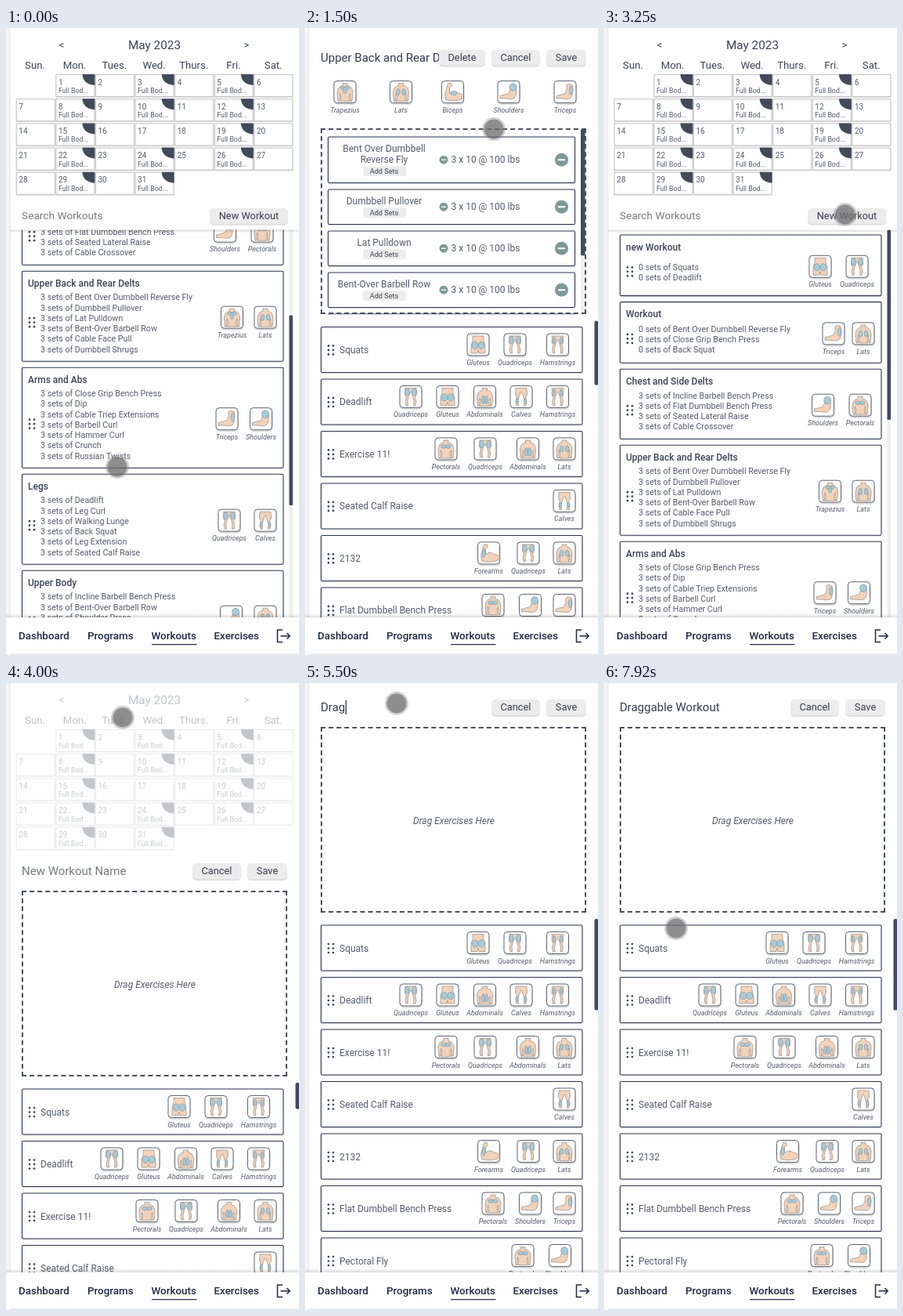
Recreate the animation shown at these times as an HTML page. Size 374x800 px, loop 8 s.

```html
<!DOCTYPE html>
<html lang="en">
<head>
<meta charset="utf-8">
<title>Workout planner</title>
<style>
  html, body { margin: 0; width: 100%; height: 100%; overflow: hidden; background: #fefefe; }
  #stage { display: block; width: 100vw; height: 100vh; font-family: Roboto, sans-serif; }
  text { white-space: pre; }
  .card { fill: #fefefe; stroke: #2b344f; stroke-width: 1.1; }
  .shade { fill: #000; opacity: .13; }
  .thumb { fill: #3e4a61; }
  .track { fill: #efefef; }
  .dash { box-sizing: border-box; height: 100%; border: 2px dashed #4a505c; }
</style>
</head>
<body>
<svg id="stage" viewBox="0 0 374 800"></svg>
<script>
const LOOP = 8000, NAV_TOP = 752, COLLAPSE = 209;
const INK = '#3d4453', SOFT = '#565d69', NAVY = '#1f2a44';

const text = (x, y, str, size, { fill = INK, anchor = 'start', weight = 400, italic = false, id = '' } = {}) =>
  `<text x="${x}" y="${y}" font-size="${size}" fill="${fill}" text-anchor="${anchor}" font-weight="${weight}"` +
  `${italic ? ' font-style="italic"' : ''}${id ? ` id="${id}"` : ''}>${str.replace(/</g, '&lt;')}</text>`;
const rect = (x, y, w, h, attrs = '') => `<rect x="${x}" y="${y}" width="${w}" height="${h}" ${attrs}/>`;
const move = (x, y, body) => `<g transform="translate(${x} ${y})">${body}</g>`;
const mid = { anchor: 'middle' };

// ---- muscle icons: label width, body shape, highlighted ellipses (x, y, rx, ry)
const SHAPES = {
  torso: 'M-9 12 L-10 2 Q-10 -5 -6 -7 L-3 -8 V-11 H3 V-8 L6 -7 Q10 -5 10 2 L9 12 H7 L6.5 2 L5 6 L6 12 H-6 L-5 6 L-6.5 2 L-7 12Z',
  legs: 'M-7 -11 H7 L7.5 -3 L5.5 1 L7 6 L6 11 H3.5 L4 5 L2.5 -1 L.5 -6 H-.5 L-2.5 -1 L-4 5 L-3.5 11 H-6 L-7 6 L-5.5 1 L-7.5 -3Z',
  hips: 'M-7 -11 H7 Q6 -5 9 1 L9 11 H1 L0 7 L-1 11 H-9 L-9 1 Q-6 -5 -7 -11Z',
  bent: 'M2 -9 Q5 -12 9 -9 Q11 -3 9 4 Q8 9 3 9 L-11 8 V5 L0 2 Q3 -3 2 -9Z',
  flexed: 'M-9 10 Q-11 3 -8 -4 L-6 -11 H-2 L-1 -8 L-4 -5 L-4 2 Q1 -3 6 1 L12 3 V9 Q3 13 -9 10Z'
};
const MUSCLES = {
  Quadriceps: [46, 'legs', [[-4.5, -6, 2.7, 4.6], [4.5, -6, 2.7, 4.6]]],
  Hamstrings: [47, 'legs', [[-4.5, -5, 1.6, 4.5], [4.5, -5, 1.6, 4.5]]],
  Calves: [30, 'legs', [[-5.3, 5, 1.4, 3.6], [5.3, 5, 1.4, 3.6]]],
  Gluteus: [32, 'hips', [[-4, 1, 4, 4.6], [4, 1, 4, 4.6]]],
  Abdominals: [47, 'torso', [[-2, 4, 1.8, 5.5], [2, 4, 1.8, 5.5]]],
  Pectorals: [38, 'torso', [[-3, -3, 3.2, 2.3], [3, -3, 3.2, 2.3]]],
  Lats: [30, 'torso', [[-3.5, 0, 2.3, 4], [3.5, 0, 2.3, 4]]],
  Trapezius: [39, 'torso', [[-2.5, -5, 3.2, 2], [2.5, -5, 3.2, 2], [0, -2, 2, 4.5]]],
  Shoulders: [41, 'bent', [[5.5, -6, 4.4, 4.8]]],
  Triceps: [30, 'bent', [[7.5, -2, 2.2, 5.5]]],
  Biceps: [30, 'flexed', [[1.5, 1.5, 4, 2.6]]],
  Forearms: [39, 'flexed', [[-6.5, 0, 2, 5.5]]]
};

function muscle(name, x, y) {
  const [, shape, spots] = MUSCLES[name];
  const marks = spots.map(([cx, cy, rx, ry]) =>
    `<ellipse cx="${cx}" cy="${cy}" rx="${rx}" ry="${ry}" fill="#a6cbdc" stroke="#6d838f" stroke-width=".5"/>`).join('');
  return move(x, y,
    rect(-14, -12.5, 29, 29, 'rx="5" class="shade"') +
    rect(-14, -14, 28, 28, 'rx="4" fill="#fefefe" stroke="#5d636f"') +
    `<path d="${SHAPES[shape]}" fill="#f2d3ba" stroke="#857a72" stroke-width=".6"/>` + marks +
    text(0, 26, name, 9, { fill: SOFT, italic: true, ...mid }));
}

function muscleRow(names, y) {
  let right = 346;
  return [...names].reverse().map(name => {
    const w = MUSCLES[name][0], x = right - w / 2;
    right -= w + 8;
    return muscle(name, x, y);
  }).join('');
}

const handle = y => [30, 36].map(x => [-5.5, 0, 5.5].map(dy =>
  `<circle cx="${x}" cy="${y + dy}" r="1.35" fill="#3d4453"/>`).join('')).join('');

const panel = (x, w, h) => rect(x, 2, w, h, 'rx="2" class="shade"') + rect(x, .5, w, h, 'rx="1.5" class="card"');

const button = (x, y, w, label) => rect(x, y - 9, w, 21, 'rx="5" fill="#dfdfdf"') +
  rect(x, y - 10, w, 20, 'rx="5" fill="#ececec"') +
  text(x + w / 2, y + 4.2, label, 12.8, { fill: '#373d4a', ...mid });

// ---- calendar
function calendar() {
  const days = ['Sun.', 'Mon.', 'Tues.', 'Wed.', 'Thurs.', 'Fri.', 'Sat.'];
  let out = text(71, 26, '<', 13, mid) + text(189.5, 27, 'May 2023', 15.3, mid) + text(307, 26, '>', 13, mid);
  days.forEach((d, i) => out += text(37 + 50.7 * i, 52, d, 13.2, mid));
  for (let d = 1; d <= 31; d++) {
    const col = d % 7, busy = col % 2 && d !== 17;
    let cell = rect(0, 1, 50, 29, 'fill="#dedede"') + rect(.5, .5, 49, 28, 'fill="#fefefe" stroke="#c4c4c6"') +
      text(3.5, 13.5, String(d), 10, { fill: SOFT });
    if (busy) cell += '<path d="M34 0H50V14Q35 13 34 0Z" fill="#414a5b"/>' + text(3.5, 24, 'Full Bod...', 8.8, { fill: SOFT });
    out += move(12.8 + 50.6 * col, 59 + 31.2 * Math.floor(d / 7), cell);
  }
  return out;
}

// ---- saved workouts
const WORKOUTS = [
  ['new Workout', 0, ['Squats', 'Deadlift'], ['Gluteus', 'Quadriceps']],
  ['Workout', 0, ['Bent Over Dumbbell Reverse Fly', 'Close Grip Bench Press', 'Back Squat'], ['Triceps', 'Lats']],
  ['Chest and Side Delts', 3, ['Incline Barbell Bench Press', 'Flat Dumbbell Bench Press', 'Seated Lateral Raise',
    'Cable Crossover'], ['Shoulders', 'Pectorals']],
  ['Upper Back and Rear Delts', 3, ['Bent Over Dumbbell Reverse Fly', 'Dumbbell Pullover', 'Lat Pulldown',
    'Bent-Over Barbell Row', 'Cable Face Pull', 'Dumbbell Shrugs'], ['Trapezius', 'Lats']],
  ['Arms and Abs', 3, ['Close Grip Bench Press', 'Dip', 'Cable Triep Extensions', 'Barbell Curl', 'Hammer Curl',
    'Crunch', 'Russian Twists'], ['Triceps', 'Shoulders']],
  ['Legs', 3, ['Deadlift', 'Leg Curl', 'Walking Lunge', 'Back Squat', 'Leg Extension', 'Seated Calf Raise'],
    ['Quadriceps', 'Calves']],
  ['Upper Body', 3, ['Incline Barbell Bench Press', 'Bent-Over Barbell Row', 'Shoulder Press', 'Lat Pulldown',
    'Barbell Curl', 'Dip'], ['Shoulders', 'Lats']]
];

function workoutCards() {
  let y = 6;
  return WORKOUTS.map(([name, sets, moves, muscles]) => {
    const n = moves.length, h = Math.max(77.6, 37 + 13 * n), c = h / 2;
    const lines = moves.map((m, i) =>
      text(44, c + 13.2 + 13.25 * (i - (n - 1) / 2), `${sets} sets of ${m}`, 10.66, { fill: SOFT })).join('');
    const card = move(0, y, panel(20.5, 333.5, h) + text(28, 20, name, 12, { weight: 500 }) +
      lines + handle(c + 8.5) + muscleRow(muscles, c + 2));
    y += h + 8;
    return card;
  }).join('');
}

// ---- exercises
const EXERCISES = [
  ['Squats', ['Gluteus', 'Quadriceps', 'Hamstrings']],
  ['Deadlift', ['Quadriceps', 'Gluteus', 'Abdominals', 'Calves', 'Hamstrings']],
  ['Exercise 11!', ['Pectorals', 'Quadriceps', 'Abdominals', 'Lats']],
  ['Seated Calf Raise', ['Calves']],
  ['2132', ['Forearms', 'Quadriceps', 'Lats']],
  ['Flat Dumbbell Bench Press', ['Pectorals', 'Shoulders', 'Triceps']],
  ['Pectoral Fly', ['Pectorals', 'Shoulders']]
];
const exerciseCards = () => EXERCISES.map(([name, muscles], i) => move(0, 7.5 + 66.5 * i,
  panel(20.5, 333.5, 58) + handle(30) + text(44, 34, name, 12, { fill: SOFT }) + muscleRow(muscles, 23))).join('');

// ---- sets of the edited workout
const minus = (x, y, r) => `<circle cx="${x}" cy="${y}" r="${r}" fill="#7c9a98"/>` +
  rect(x - r * .55, y - r * .12, r * 1.1, r * .24, 'fill="#fefefe"');

function setCards() {
  let y = 10;
  return [['Bent Over Dumbbell', 'Reverse Fly'], ['Dumbbell Pullover'], ['Lat Pulldown'], ['Bent-Over Barbell Row'],
    ['Cable Face Pull'], ['Dumbbell Shrugs']].map(lines => {
    const n = lines.length, h = 30.5 + 14 * n, c = h / 2;
    const card = move(0, y, panel(29.5, 315, h) +
      lines.map((l, i) => text(101, 19.7 + 14 * i, l, 12, { fill: SOFT, ...mid })).join('') +
      rect(74, 10 + 14 * n, 55, 12.5, 'rx="4" fill="#ececec"') + text(101, 19.7 + 14 * n, 'Add Sets', 9.2, mid) +
      minus(177, c + .5, 5.5) + text(186.5, c + 4.7, '3 x 10 @ 100 lbs', 12, { fill: SOFT }) + minus(327.5, c + .5, 8.5));
    y += h + 8.5;
    return card;
  }).join('');
}

const navBar = () => rect(0, 747, 374, 5, 'fill="url(#lift)"') + rect(0, NAV_TOP, 374, 48, 'fill="#fefefe"') +
  [['Dashboard', 16], ['Programs', 104], ['Workouts', 185.5], ['Exercises', 265.5]].map(([label, x]) =>
    text(x, 780.3, label, 13.4, { fill: NAVY, weight: 500 })).join('') +
  rect(186, 786, 57.5, 1.2, `fill="${NAVY}"`) + rect(5, 798.5, 369, 1, 'fill="#dcdcdc"') +
  `<path d="M353 768H346.5V783.5H353M350.5 775.7H362M358.5 772L362.2 775.7L358.5 779.5" fill="none" stroke="${NAVY}" stroke-width="1.5"/>`;

const musclesUsed = [['Trapezius', 51], ['Lats', 122.5], ['Biceps', 188.5], ['Shoulders', 260], ['Triceps', 332]];

document.getElementById('stage').innerHTML = `
  <defs>
    <linearGradient id="lift" x2="0" y2="1"><stop stop-color="#000" stop-opacity="0"/><stop offset="1" stop-color="#000" stop-opacity=".13"/></linearGradient>
    <linearGradient id="drop" x2="0" y2="1"><stop stop-color="#000" stop-opacity=".14"/><stop offset="1" stop-color="#000" stop-opacity="0"/></linearGradient>
  </defs>
  ${rect(0, 0, 374, 800, 'fill="#fefefe"')}
  ${rect(0, 0, 5, 800, 'fill="#f5f5f5"')}${rect(4.5, 0, 1, 800, 'fill="#e3e3e3"')}
  <g id="calendar">${calendar()}</g>
  <g id="browse">
    <svg id="listView" width="374"><g id="list">${workoutCards()}</g>
      ${rect(361.5, 0, 4.5, 800, 'class="track"')}<rect id="listThumb" class="thumb" x="361.5" width="4.5" rx="1.5"/>
      ${rect(5, 0, 369, 4, 'fill="url(#drop)"')}</svg>
    <g id="searchRow">${text(20, 5.5, 'Search Workouts', 13.7, { fill: '#777a80' })}${button(260, 1, 100, 'New Workout')}</g>
  </g>
  <g id="form">
    <svg id="exerciseView" width="374">${exerciseCards()}<rect id="exerciseThumb" class="thumb" x="369.5" width="5" rx="2"/></svg>
    <g id="nameRow">${text(20, 5, '', 15, { id: 'name' })}<rect id="caret" y="-9" width="1.2" height="18" fill="${NAVY}"/>
      <g id="delete">${button(171, 0, 59, 'Delete')}</g>${button(238, 0, 62, 'Cancel')}${button(308, 0, 51, 'Save')}</g>
    <g id="muscles">${musclesUsed.map(([m, x]) => muscle(m, x, 0)).join('')}</g>
    <svg id="setView" width="374">${setCards()}${rect(352, 0, 6, 300, 'class="track"')}<rect id="setThumb" class="thumb" x="352" width="5.5" rx="1.5"/></svg>
    <foreignObject id="dropZone" x="20" width="339"><div class="dash"></div></foreignObject>
    ${text(190, 0, 'Drag Exercises Here', 12, { fill: SOFT, italic: true, id: 'hint', ...mid })}
  </g>
  ${navBar()}
  <g id="pointer"><circle r="15" fill="#8c8c8c" opacity=".4"/><circle r="12.5" fill="#666" opacity=".62"/>
    <circle id="press" r="10" fill="#333" opacity=".45"/></g>`;

// ---- timeline
const $ = id => document.getElementById(id);
const set = (id, attrs) => { for (const k in attrs) $(id).setAttribute(k, attrs[k]); };
const show = (id, on) => set(id, { visibility: on ? 'inherit' : 'hidden' });
const shift = (id, y, x = 0) => set(id, { transform: `translate(${x} ${y})` });

function track(steps, t, ease = u => u) {
  let i = 0;
  while (i < steps.length - 2 && t >= steps[i + 1][0]) i++;
  const [a, ...from] = steps[i], [b, ...to] = steps[i + 1];
  const u = ease(Math.min(1, Math.max(0, (t - a) / (b - a))));
  return from.map((v, k) => v + (to[k] - v) * u);
}
const easeOut = u => 1 - (1 - u) ** 2;
const easeBoth = u => u * u * (3 - 2 * u);

const FADE = [[0, 1], [1010, 1], [1300, 0], [2400, 0], [2700, 1], [3800, 1], [4090, 0], [LOOP, 0]];
const FOLD = [[0, 0], [1300, 0], [1545, 1], [2150, 1], [2400, 0], [4090, 0], [4335, 1], [LOOP, 1]];
const POINTER = [[0, 142, 560], [330, 142, 560], [850, 160, 375], [1010, 163, 355], [1170, 185, 277], [1500, 241, 129],
  [1920, 267, 40], [2200, 266, 36], [2500, 262, 43], [3150, 308, 238], [3600, 306, 238], [4000, 149, 44],
  [4350, 117, 26], [7300, 117, 26], [7920, 92, 313], [LOOP, 92, 313]];
const PRESSES = [980, 2120, 3600, 4400];
const NAME = 'Draggable Workout';

function render(t) {
  const [fade] = track(FADE, t), [fold] = track(FOLD, t, easeOut);
  const editing = t >= 1010 && t < 2150, creating = t >= 3800;
  const lift = COLLAPSE * fold;

  set('calendar', { opacity: fade });
  show('browse', !editing && !creating);
  show('form', editing || creating);

  const listTop = 257.5 - lift, listRoom = NAV_TOP - listTop, scroll = t < 1010 ? 222 : 0;
  set('listView', { y: listTop, height: listRoom });
  shift('list', -scroll);
  set('listThumb', { y: scroll * listRoom / 1008, height: listRoom ** 2 / 1008 });
  shift('searchRow', 238.7 - lift);

  const rowY = 240 - lift;
  const zoneTop = rowY + (editing ? 82 + 9 * fold : 25), zoneRoom = editing ? 207 + 31 * fold : 237;
  shift('nameRow', rowY);
  shift('muscles', rowY + 39 + 5 * fold);
  show('delete', editing);
  show('muscles', editing);
  show('setView', editing);
  show('hint', creating);
  set('dropZone', { y: zoneTop, height: zoneRoom });
  set('setView', { y: zoneTop, height: zoneRoom });
  set('setThumb', { height: zoneRoom ** 2 / 347 });
  set('hint', { y: zoneTop + zoneRoom / 2 + 5 });

  const viewTop = zoneTop + zoneRoom + 8, room = NAV_TOP - viewTop;
  set('exerciseView', { y: viewTop, height: room });
  set('exerciseThumb', { height: room ** 2 / 1745 });

  const typed = NAME.slice(0, Math.max(0, Math.floor((t - 4930) / 135)));
  const name = $('name');
  name.textContent = editing ? 'Upper Back and Rear Delts' : typed || 'New Workout Name';
  name.setAttribute('fill', editing || typed ? '#343c50' : '#777a80');
  const focused = creating && t > 4450 && t < 7550;
  show('caret', focused);
  if (focused) set('caret', { x: typed ? 20.5 + name.getComputedTextLength() : 20 });

  const [x, y] = track(POINTER, t, easeBoth);
  shift('pointer', y, x);
  show('press', PRESSES.some(p => t >= p && t < p + 230));
}

const start = performance.now();
function tick() {
  render((performance.now() - start) % LOOP);
  requestAnimationFrame(tick);
}
tick();
</script>
</body>
</html>
```
